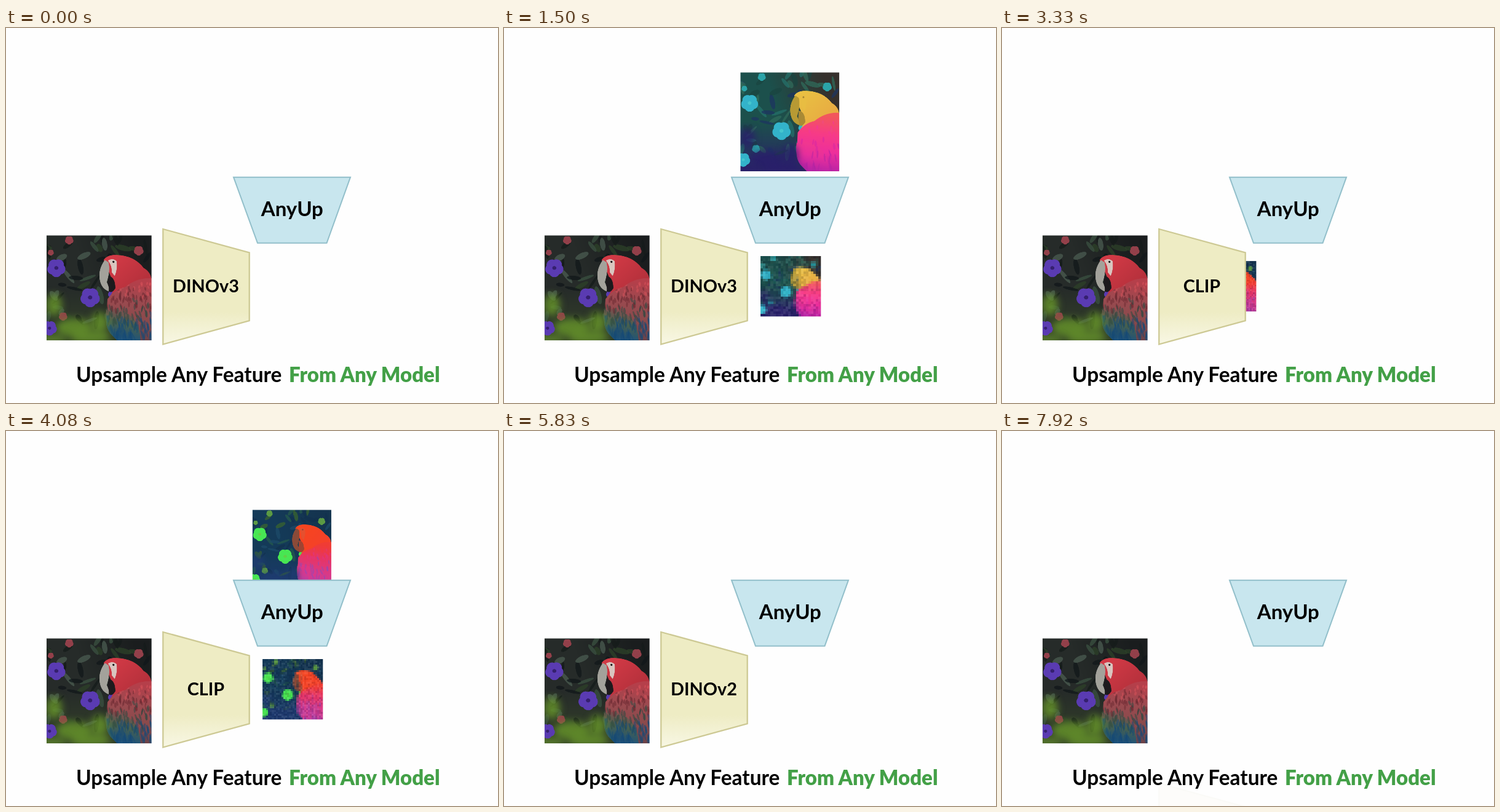
Animation of 800 by 610 pixels, one loop 8 s. Source, as an HTML page with a canvas:

```html
<!DOCTYPE html>
<html lang="en">
<head>
<meta charset="utf-8">
<title>Upsample Any Feature From Any Model</title>
<style>
  html, body { margin: 0; width: 100%; height: 100%; overflow: hidden; background: #fefefe; }
  #stage { position: absolute; left: 0; top: 0; width: 800px; height: 610px; overflow: hidden; }
  canvas, svg { position: absolute; left: 0; top: 0; }
  canvas { width: 171px; height: 171px; transform-origin: 0 0; }
  .coarse { image-rendering: pixelated; }
  text { font-family: Lato, "Open Sans", sans-serif; font-weight: 700; font-size: 33px; text-anchor: middle; }
  .title { font-size: 33.4px; text-anchor: start; }
  .strong { font-weight: 900; font-size: 33px; text-anchor: end; fill: #43a047; }
</style>
</head>
<body>
<div id="stage">
  <svg width="800" height="610" viewBox="0 0 800 610">
    <defs>
      <linearGradient id="cream" x1="0" y1="0" x2="0" y2="1">
        <stop offset=".72" stop-color="#eeecc4"/>
        <stop offset="1" stop-color="#f8f7e4"/>
      </linearGradient>
    </defs>
    <g id="model">
      <path d="M255.3 327L395.7 365.3V476L255.3 514.5Z" fill="url(#cream)" stroke="#cdc994" stroke-width="2.3"/>
      <text id="label" x="325" y="430" style="font-size:28.8px"></text>
    </g>
    <path d="M370 242.7H560L521.5 349.8H409Z" fill="#c8e6ee" stroke="#92bfca" stroke-width="2"/>
    <text x="465.3" y="306">AnyUp</text>
    <text class="title" x="114" y="576">Upsample Any Feature</text>
    <text class="strong" x="705.5" y="576">From Any Model</text>
  </svg>
</div>
<script>
const SIDE = 171, PERIOD = 8000 / 3;
const stage = document.getElementById('stage');
const model = document.getElementById('model');
const label = document.getElementById('label');
const svg = stage.querySelector('svg');

const HEAD = 'M93 40Q99 31 115 32Q143 33 158 53Q171 60 171 76L150 104L104 98Q113 86 106 70Z';
const FACE = 'M100 41Q108 36 114 42Q116 54 111 66L106 60Q107 50 100 41Z';
const BEAK = 'M95 40Q83 56 87 74Q90 87 101 91Q103 86 98 76Q104 58 101 44Z';
const JAW = 'M101 66Q112 68 112 86Q107 95 101 91Q99 80 101 66Z';
const BODY = 'M99 104Q110 88 128 84Q148 68 171 70V171H115L106 162Q94 150 98 128Z';
const WING = 'M97 122Q112 116 130 126Q152 138 153 171H115L106 162Q94 150 97 122Z';
const FLOWERS = [[16, 53, 15], [71, 101, 16], [5, 151, 12], [108, 95, 8]];
const BUDS = [[150, 25, 8], [37, 8, 7], [7, 28, 5], [27, 132, 7]];

const photo = {
  sky: ['#262b29', '#1a1d1e', '#35432a'], leaf: ['#3a5140', '#4a5b50', '#141b1a', '#2c4028', '#11171a'],
  flower: '#5a3bb2', core: '#35206f', bud: '#93404a', fore: '#68962b',
  head: ['#d23a46', '#b02f3a'], beak: '#a3a29b', jaw: '#1d1a1d', face: '#d9c5bf',
  body: ['#b53f4a', '#9c4a50', '#8a4a4c', '#6b4248'], wing: ['#8d4c50', '#47604e', '#1d527c'],
  feather: ['#d9525a', '#6a2830', '#2a4840', '#174a76'], grain: 190
};
const maps = [
  { name: 'DINOv3', cells: 24,
    sky: ['#1c504c', '#36302c', '#2b2468'], leaf: ['#24706a', '#1a4440', '#2f6a5a', '#1d3560'],
    flower: '#33b3ca', core: '#45c6cf', bud: '#2ba3a8', fore: '#2a1f6c',
    head: ['#e9c043', '#e8a742'], beak: '#b79a34', jaw: '#a98a35', face: '#e8bd42',
    body: ['#f2575c', '#f73b86', '#ee2f9c', '#bd23a4'], wing: ['#f43a8c', '#e82f9c', '#b823a6'],
    feather: ['#f04b86', '#f5369a', '#d527a6', '#b425a4'], grain: 40 },
  { name: 'CLIP', cells: 32,
    sky: ['#143a58', '#14344f', '#1d3a6c'], leaf: ['#245a4c', '#39632f', '#12304e', '#1c4a68'],
    flower: '#48e653', core: '#62cf48', bud: '#5c9a44', fore: '#203c72',
    head: ['#f7451f', '#f4402c'], beak: '#8a4a38', jaw: '#a04432', face: '#e5502f',
    body: ['#f03c34', '#e63566', '#d83a88', '#b840a4'], wing: ['#e8357a', '#d03a94', '#a044b0'],
    feather: ['#f6383c', '#e2367e', '#8d4abc', '#e23888'], grain: 130 },
  { name: 'DINOv2', cells: 36,
    sky: ['#ee8596', '#c274f2', '#ead97c'], leaf: ['#f07668', '#df8fb8', '#efa070', '#d487dc'],
    flower: '#9b8b36', core: '#8c8038', bud: '#cf8048', fore: '#e9d878',
    head: ['#4b2b9a', '#43297f'], beak: '#6a40bc', jaw: '#50309c', face: '#53329f',
    body: ['#318c98', '#26b596', '#1fd09c', '#24d2a2'], wing: ['#28b498', '#1fcc9a', '#24d2a2'],
    feather: ['#2cb89a', '#1cc894', '#3cd6b0', '#28c0a0'], grain: 60 }
];

function seeded(seed) {
  return () => (seed = seed * 16807 % 2147483647) / 2147483647;
}

function ramp(c, x0, y0, x1, y1, colors) {
  const g = c.createLinearGradient(x0, y0, x1, y1);
  colors.forEach((color, i) => g.addColorStop(i / (colors.length - 1), color));
  return g;
}

function oval(c, x, y, rx, ry, turn, fill) {
  c.fillStyle = fill;
  c.beginPath();
  c.ellipse(x, y, rx, ry, turn, 0, 7);
  c.fill();
}

function bloom(c, [x, y, r], fill, core) {
  for (let i = 0; i < 5; i++) {
    const a = i * Math.PI * .4 + .3;
    oval(c, x + Math.cos(a) * r * .5, y + Math.sin(a) * r * .5, r * .5, r * .55, a, fill);
  }
  oval(c, x, y, r * .22, r * .2, 0, core);
}

function shape(c, d, fill) {
  c.fillStyle = fill;
  c.fill(new Path2D(d));
}

// Draws the bird among flowers in the colours of p.
function paint(c, p, k) {
  const rnd = seeded(77);
  const pick = list => list[Math.floor(rnd() * list.length)];
  c.scale(k, k);
  c.fillStyle = ramp(c, 0, 0, 0, SIDE, [p.sky[0], p.sky[0], p.sky[2]]);
  c.fillRect(0, 0, SIDE, SIDE);
  c.fillStyle = ramp(c, 60, 50, 150, 20, [p.sky[1] + '00', p.sky[1]]);
  c.fillRect(0, 0, SIDE, SIDE);

  c.globalAlpha = .75;
  for (let i = 0; i < 80; i++) {
    const x = rnd() * 165, y = rnd() * 140;
    oval(c, x, y, 6 + rnd() * 9, 2 + rnd() * 3, rnd() * 3, pick(p.leaf));
  }
  c.globalAlpha = 1;
  BUDS.forEach(b => bloom(c, b, p.bud, p.bud));
  FLOWERS.forEach(f => bloom(c, f, p.flower, p.core));

  shape(c, HEAD, ramp(c, 110, 35, 160, 90, p.head));
  shape(c, FACE, p.face);
  shape(c, JAW, p.jaw);
  shape(c, BEAK, p.beak);
  oval(c, 109, 43, 1.6, 1.6, 0, p.jaw);
  shape(c, BODY, ramp(c, 145, 75, 135, 168, p.body));
  shape(c, WING, ramp(c, 128, 118, 118, 168, p.wing));

  c.save();
  c.clip(new Path2D(BODY));
  c.globalAlpha = .5;
  for (let i = 0; i < p.grain; i++) {
    const x = 96 + rnd() * 75, y = 78 + rnd() * 92;
    const tone = Math.min(3, Math.floor((y - 78) / 24 + rnd()));
    oval(c, x, y, 1 + rnd() * 1.2, 2 + (y - 70) / 15, .25 - rnd() * .7, p.feather[tone]);
  }
  c.restore();

  c.filter = `blur(${6 * k}px)`;
  c.globalAlpha = .8;
  [[12, 113, 13, 18], [45, 150, 30, 15], [86, 142, 14, 17], [72, 165, 32, 10], [8, 168, 24, 6]]
    .forEach(([x, y, rx, ry]) => oval(c, x, y, rx, ry, 0, p.fore));
  c.filter = 'none';
  c.globalAlpha = 1;
  bloom(c, FLOWERS[2], p.flower, p.core);
}

function picture(p, size, coarse) {
  const el = document.createElement('canvas');
  el.width = el.height = size;
  const c = el.getContext('2d');
  paint(c, p, size / SIDE);
  if (coarse) {
    el.className = 'coarse';
    c.setTransform(1, 0, 0, 1, 0, 0);
    const rnd = seeded(size);
    for (let i = 0; i < size * size; i++) {
      const v = rnd();
      c.fillStyle = v < .5 ? `rgba(0,0,40,${v * .3})` : `rgba(255,255,255,${(v - .5) * .18})`;
      c.fillRect(i % size, Math.floor(i / size), 1, 1);
    }
  }
  stage.insertBefore(el, svg);
  return el;
}

function place(el, x, y, size) {
  el.style.transform = `translate(${x - size / 2}px, ${y - size / 2}px) scale(${size / SIDE})`;
}

function ease(t, start, span) {
  const u = Math.min(1, Math.max(0, (t - start) / span));
  return (1 - Math.cos(Math.PI * u)) / 2;
}

const mix = (a, b, p) => a + (b - a) * p;

place(picture(photo, SIDE * 2), 151.3, 422.8, SIDE);
for (const m of maps) {
  m.low = picture(m, m.cells, true);
  m.high = picture(m, SIDE * 2);
}

function draw(now) {
  const time = now % 8000;
  const turn = Math.min(2, Math.floor(time / PERIOD));
  const t = time - turn * PERIOD;
  const low = ease(t, 495, 430), high = ease(t, 1165, 410);

  maps.forEach((m, i) => {
    const on = i === turn && t < 2300;
    m.low.style.display = on && low > 0 ? '' : 'none';
    m.high.style.display = on && high > 0 ? '' : 'none';
    place(m.low, mix(325, 466.3, low), 420.2, mix(74, 98.5, low));
    place(m.high, 464.8, mix(296, 140.5, high), mix(43, SIDE, high));
  });

  // The first model is already in place when the loop starts.
  const shown = (turn ? ease(t, 30, 400) : 1) - ease(t, 2310, 330);
  label.textContent = maps[turn].name;
  model.setAttribute('transform', `translate(0 ${262 * (1 - shown)})`);
  model.setAttribute('opacity', shown);
}

function tick() {
  draw(performance.now());
  requestAnimationFrame(tick);
}
tick();
</script>
</body>
</html>
```
